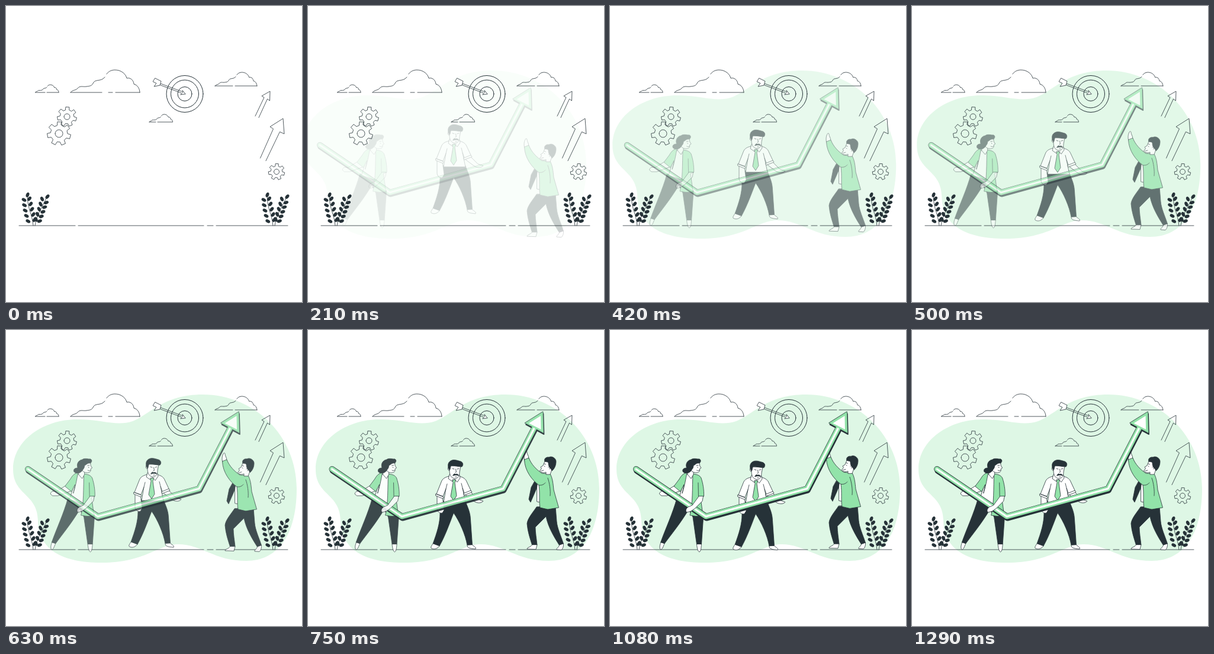
Recreate the animation shown at these times as an HTML page. Size 500 by 500 pixels, loop 1330 ms.

```html
<!DOCTYPE html>
<html lang="en">
<head>
<meta charset="utf-8">
<title>Growth</title>
<style>
  html, body { margin: 0; width: 100%; height: 100%; overflow: hidden; background: #fff; }
  svg { display: block; width: 100%; height: 100%; }
  .line { fill: none; stroke: #263238; stroke-width: .8; stroke-linecap: round; stroke-linejoin: round; }
  .w { fill: #fff; }
  .g { fill: #92e3a9; }
  .d { fill: #263238; }
</style>
</head>
<body>
<svg viewBox="0 0 500 500">
  <defs>
    <path id="cloud" vector-effect="non-scaling-stroke" d="M0 38C4 33 9 35 12 31C16 26 21 29 27 28C34 27 36 27 39 21C42 16 51 19 56 14L58 12M61 7C64 2 70 0 75 0C85 0 93 6 95 14C103 12 107 20 107 24C113 25 117 32 117 38"/>
    <path id="shaft" d="M42 235L160 315L331 268L383 167" fill="none" stroke-linecap="round" stroke-linejoin="round"/>
    <path id="head" d="M368.500 157L398 138.500L399 173.500Z" stroke-linejoin="round"/>
  </defs>

  <path class="part" data-x="-30" data-dur="1" data-lead=".1" fill="#def7e5"
    d="M11 235C11 185 65 149 124 151C165 152 186 163 213 154C242 143 265 109 331 109C420 109 490 180 490 268C490 345 459 390 405 390C350 390 330 362 290 362C255 362 235 393 160 393C95 393 54 372 53 322C52 275 11 280 11 235Z"/>

  <g class="line">
    <path d="M22 371H117M122 371H334M340 371H350M355 371H476"/>
    <use href="#cloud" transform="translate(109 108)"/>
    <use href="#cloud" transform="translate(49.5 133) scale(.338)"/>
    <use href="#cloud" transform="translate(242 183) scale(.338)"/>
    <use href="#cloud" transform="translate(353 112) scale(.606)"/>
    <path d="M109 146H162M173 146H180M185 146H226M49.500 146H66M69 146H89M242 196H253M256 196H281M353 135H383M387 135H424"/>
    <g stroke-width="1">
      <circle cx="302" cy="148.500" r="31"/>
      <circle cx="302" cy="148.500" r="23.500"/>
      <circle cx="302" cy="148.500" r="12"/>
    </g>
    <path d="M261 131L297 144.500M260.500 133.500L296 147"/>
    <path class="w" d="M252 122L262 127L260 134L250 136L254 130.500L248.500 128Z"/>
    <path class="w" d="M303 148.500L298 142.500L298.500 146L295 149.500Z"/>
    <path d="M421 186L436 154.500L432 152L446 144L445.500 160L441.500 157L427 188.500"/>
    <path d="M429.500 257L451.500 207.500L446 204L468 190L470 216L462.500 212.500L439 261.500"/>
    <path id="gears"/>
  </g>
  <g id="plant">
    <path class="line" d="M46 371C44 350 37 345 36 321M49 371C52 350 62 340 69 322"/>
  </g>
  <use href="#plant" x="405"/>

  <!-- woman -->
  <g class="part line" data-x="-30" data-lead=".16">
    <path class="d" d="M111 284C104 310 92 335 83.500 359L90 361C101 346 119 324 131 303L138 316L144.500 362L152.500 362L156 312L136 288Z"/>
    <path class="w" d="M84 359C82 363 81 370 84 371C87 370 88 365 90 361ZM144.500 362C145 367 146 374 149 375C152 373 152 367 152.500 362Z"/>
    <path class="w" d="M107 263L91 273C86 271 82 273 81.500 277L85 280L94 280L116 272Z"/>
    <path class="w" d="M125 244L138 244L141 258L137 294L114 286L121 262Z"/>
    <path class="g" d="M128 241C121 242 118 247 115 252L106 264L117 273L123 261L120 276C124 264 126 252 128 241Z"/>
    <path class="g" d="M138 243C146 244 150 246 152 250C155 259 157 270 156.500 281L151 283L155 313C147 316 140 314 133 313C138 296 137 265 138 243Z"/>
    <path d="M147 258L147.500 281"/>
    <path class="w" d="M130 234L129 244L135 251L139 244L139 240Z"/>
    <path class="w" d="M137 226L149 224L149.500 229L152 233L149.500 234.500C150 239 148 241 144 241C140 241 136 240 134 235Z"/>
    <path class="d" d="M136 236C134 242 124 244 121 239C120 235 123 233 127.500 233C125 226 129 220 135 219C139 216 145 218 147 218C151 217 153 222 149 225C144 224 142 228 139 229C139 232 138 234 136 236Z"/>
    <path d="M144 229L147 228.500M146 231.500V232.500M144.500 237C146 238 147 238 149 237"/>
  </g>

  <!-- man in the middle -->
  <g class="part line" data-y="-30" data-lead=".27">
    <path class="d" d="M228 289L266 289C269 299 274 306 274.500 320L277.500 363L269 363.500C266 346 256 323 246 309C238 330 231 349 222 365L211 361C218 342 223 326 223 310Z"/>
    <path class="w" d="M211 361C209 364 206 368 209 369C213 371 218 370 222 365ZM269 363.500C269 368 272 369 283 370C285 367 279 365 277.500 363Z"/>
    <path class="w" d="M218 279L218 302C219 308 223 310 227 309L230 304L227 281Z"/>
    <path class="w" d="M264 277L280 289C285 293 293 293 296 289L287 286L274 273Z"/>
    <path class="w" d="M238 247C231 249 227 251 225 257L217 277L228 281L233 268L229 291L266 291L261 267L265 278L276 273L268 256C266 251 262 249 256 247Z"/>
    <path class="w" d="M216 277L229 282L228 285L216 280ZM263 276L275 271L277 274L264 279Z"/>
    <path d="M233 268L235 260M261 267L259 259"/>
    <path class="w" d="M239 244L237 251L244 256L247 252L252 257L257 250L256 245Z"/>
    <path class="g" d="M244 253L250 253L248 258L251 280L246 288L241 281L245 258Z"/>
    <path class="w" d="M238 230C236 232 235 236 239 238C239 246 243 251 249 251C254 250 256 246 256 240L258 230Z"/>
    <path class="d" d="M239 237C235 230 236 223 242 220.500C247 218 254 221 258 222C263 224 262 229 260 231C254 231 247 229 242 229C240 231 241 235 239 237Z"/>
    <path class="d" d="M245 246C245.500 242.500 248 242.500 249.500 243.500C252 242.500 254 244 254.500 246C251 244.500 248 245 245 246Z"/>
    <path d="M244 234L247 235M252 235L255 234M249.500 235L250.500 240L249 240.500M249 248H251"/>
  </g>

  <!-- man on the right -->
  <g class="part line" data-y="30" data-lead=".27">
    <path class="d" d="M386 299C380 308 371 318 370 327C371 340 375 352 378.500 363L387 363C386 353 384 342 384 333L402 315C406 334 416 350 424.500 363.500L431.500 361C427 347 421 335 420 323L418 298Z"/>
    <path class="w" d="M378.500 363C376 367 370 367 370 370L385 370.500L387 363ZM424.500 363.500C424 367 419 369 420 371L428 371.500C430 370 432 366 431.500 361Z"/>
    <path class="w" d="M387 250L396 254L396 292L387 290Z"/>
    <path class="d" d="M385 252L388 257L386 268L376 291L373 286L377 266Z"/>
    <path class="w" d="M365.500 219C364 213 366 207 368 205C370 204 370 207 370.500 209L372.500 214L373 222L367 223Z"/>
    <path class="g" d="M365.500 219L373 216C377 227 386 236 395 242L409 243C413 250 414 259 415 270C418 281 421 291 423.500 300L405 303L392 300C390 290 392 275 390 262C379 254 366 238 365.500 219Z"/>
    <path d="M390 262C396 263 399 260 401 258M405 250C408 258 410 271 409 280"/>
    <path class="w" d="M400 222L397 229L393 231.500L394.500 234L391.500 238C394 241 398 242 402 240L402 244L409 244L413 233L409 222Z"/>
    <path class="d" d="M400 222C398 217 403 214 407 215C412 212 419 217 419 222C419 228 417 234 412 238L410 234C407 232 406 228 406 224C404 222 402 223 400 222Z"/>
    <path d="M399 226L401.500 227M399 230L400 230.500M394 238L398 237M406 232C408 230 410 232 408 235"/>
  </g>

  <!-- growth arrow -->
  <g class="part" data-x="-30" data-lead=".2">
    <g fill="#263238" stroke="#263238">
      <use href="#shaft" x="1" y="2.800" stroke-width="9.500"/>
      <use href="#head" x="1" y="2.800" stroke-width="1.600"/>
      <use href="#shaft" stroke-width="10"/>
      <use href="#head" stroke-width="2"/>
    </g>
    <g fill="#92e3a9" stroke="#92e3a9">
      <use href="#shaft" stroke-width="8.600"/>
      <use href="#head" stroke-width=".6"/>
    </g>
    <use href="#shaft" stroke="#fff" stroke-width="3.200"/>
    <path class="w" d="M374.500 157.500L394.500 145L395 168Z"/>
  </g>

  <!-- forearm over the arrow -->
  <g class="part line" data-x="-30" data-lead=".16">
    <path class="w" d="M148 281L137 296L130 299C126 302 125 306 128 308L135 306L142 301L154 289L155.500 281Z"/>
  </g>
</svg>
<script>
const NS = 'http://www.w3.org/2000/svg';
const LOOP = 1330, FPS = 24;

function gear(cx, cy, r, hole, teeth = 7) {
  const step = 2 * Math.PI / teeth, pts = [];
  for (let i = 0; i < teeth; i++) {
    const a = i * step - 1.52;
    for (const [da, k] of [[-.3, .72], [-.2, 1], [.2, 1], [.3, .72]])
      pts.push((cx + r * k * Math.cos(a + da * step)).toFixed(1) + ' ' +
               (cy + r * k * Math.sin(a + da * step)).toFixed(1));
  }
  return `M${pts.join('L')}ZM${cx - hole} ${cy}a${hole} ${hole} 0 1 0 ${2 * hole} 0a${hole} ${hole} 0 1 0 ${-2 * hole} 0`;
}
document.getElementById('gears').setAttribute('d',
  gear(103, 187, 16.5, 5) + gear(89.5, 215.5, 20, 6.5) + gear(457, 280, 13.8, 4.5));

const plant = document.getElementById('plant');
function leaf(x, y, turn) {
  const e = document.createElementNS(NS, 'ellipse');
  e.setAttribute('class', 'd');
  e.setAttribute('rx', 4.2);
  e.setAttribute('ry', 2.7);
  e.setAttribute('transform', `translate(${x} ${y}) rotate(${turn})`);
  plant.append(e);
}
leaf(36.5, 319, -70);
leaf(70, 322, -50);
for (let i = 0; i < 5; i++) {
  leaf(30.5 + .3 * i + .35 * i * i, 327.5 + 9 * i, 30);
  leaf(39.5 + 2.2 * i, 325.5 + 8.9 * i, -50);
  leaf(61 - 2.6 * i, 326 + 8.6 * i, 65);
  leaf(68 - 2.8 * i, 332 + 7.8 * i, -20);
}

// cubic-bezier(.36, -.01, .5, 1.38)
const curve = (s, a, b) => 3 * a * s * (1 - s) ** 2 + 3 * b * s * s * (1 - s) + s ** 3;
function ease(x) {
  if (x >= 1) return 1;
  let lo = 0, hi = 1;
  for (let i = 0; i < 24; i++) {
    const mid = (lo + hi) / 2;
    if (curve(mid, .36, .5) < x) lo = mid; else hi = mid;
  }
  return Math.max(0, curve(lo, -.01, 1.38));
}

const parts = [...document.querySelectorAll('.part')].map(el => {
  const { x = 0, y = 0, dur = 1.5, lead } = el.dataset;
  return { el, x: +x, y: +y, dur: +dur, lead: +lead };
});

function draw(now) {
  const step = Math.floor((now % LOOP + 5) * FPS / 1000);
  for (const p of parts) {
    const k = step < 2 ? 0 : ease((step / FPS + p.lead) / p.dur);
    p.el.setAttribute('opacity', Math.min(1, k ** 1.5));
    p.el.setAttribute('transform', `translate(${p.x * (1 - k)} ${p.y * (1 - k)})`);
  }
}
let start;
function tick(now) {
  start ??= now;
  draw(now - start);
  requestAnimationFrame(tick);
}
draw(0);
requestAnimationFrame(tick);
</script>
</body>
</html>
```
